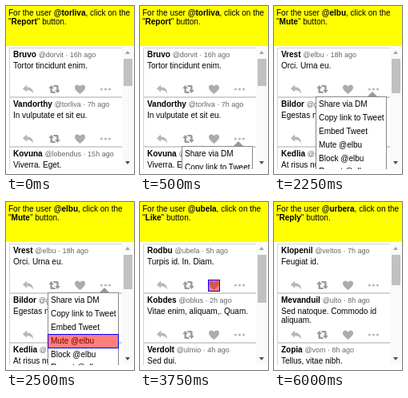
Recreate the animation shown at these times as an HTML page. Size 160 px wide and 210 px high, loop 7.25 s.

```html
<!DOCTYPE html>
<html lang="en">
<head>
<meta charset="utf-8">
<title>Social feed tasks</title>
<style>
html, body { margin: 0; width: 100%; height: 100%; overflow: hidden; background: #fff; }
#stage {
  position: relative; width: 160px; height: 210px; overflow: hidden;
  font: 10px/11px "Liberation Sans", Arial, sans-serif; color: #000;
}
#stage div, #stage svg { position: absolute; box-sizing: border-box; }
.scene { inset: 0; }
.query { left: 0; top: 0; width: 160px; height: 50px; padding: 3px; background: #ff0; white-space: nowrap; }
.area { left: 0; top: 0; width: 160px; height: 204px; overflow: hidden; }
.card { left: 4px; width: 141px; height: 62px; border: 1px solid #d3d3d3; border-right: 0; }
.head { left: 4px; top: 2px; white-space: nowrap; }
.head span { font-size: 9px; line-height: 9px; color: #666; }
.text { left: 4px; top: 16px; width: 131px; }
.card svg { top: 44px; width: 15px; height: 15px; fill: #b8b8b8; }
.card svg.retweet { fill: #999; }
.card svg.like { fill: #acacac; }
.track { left: 145px; top: 51px; width: 15px; height: 153px; background: #fafafa; }
.thumb { left: 2px; top: 15px; width: 11px; background: #c1c1c1; }
.arrow { left: 4px; border: 4px solid transparent; border-width: 0 3.5px 4px; }
.up { top: 5px; border-bottom-color: #a3a3a3; }
.down { bottom: 6px; border-width: 4px 3.5px 0; border-top-color: #505050; }
.menu { left: 52px; width: 89px; height: 110px; background: #fff; border: 1px solid #888; }
.menu div { left: 3px; white-space: nowrap; }
.caret { left: 117px; border: 6px solid transparent; border-width: 0 6.5px 6px; border-bottom-color: #999; }
.mark { background: rgba(255, 0, 0, .5); border: 1px solid #00f; }

/* one loop, hard cuts */
.timed { visibility: hidden; animation: 7250ms step-end infinite; }
@keyframes report { 0% { visibility: visible } 24.1379%, 100% { visibility: hidden } }
@keyframes mute { 0% { visibility: hidden } 24.1379% { visibility: visible } 48.2758%, 100% { visibility: hidden } }
@keyframes like { 0% { visibility: hidden } 48.2758% { visibility: visible } 65.5172%, 100% { visibility: hidden } }
@keyframes retweet { 0% { visibility: hidden } 65.5172% { visibility: visible } 82.7586%, 100% { visibility: hidden } }
@keyframes reply { 0% { visibility: hidden } 82.7586%, 100% { visibility: visible } }
@keyframes reportMore { 0% { visibility: hidden } 3.4482% { visibility: visible } 6.8965%, 100% { visibility: hidden } }
@keyframes reportMenu { 0% { visibility: hidden } 6.8965% { visibility: visible } 24.1379%, 100% { visibility: hidden } }
@keyframes muteMore { 0% { visibility: hidden } 27.5862% { visibility: visible } 31.0344%, 100% { visibility: hidden } }
@keyframes muteMenu { 0% { visibility: hidden } 31.0344% { visibility: visible } 48.2758%, 100% { visibility: hidden } }
@keyframes mutePick { 0% { visibility: hidden } 34.4827% { visibility: visible } 48.2758%, 100% { visibility: hidden } }
@keyframes likePick { 0% { visibility: hidden } 51.7241% { visibility: visible } 65.5172%, 100% { visibility: hidden } }
</style>
</head>
<body>
<svg width="0" height="0" style="position:absolute">
  <symbol id="reply" viewBox="0 0 15 15"><path d="M.8 6.2 6 1.6V4.3C11 4.3 14 7.2 14.2 12.6 12.6 9.6 10 8.2 6 8.2V10.8Z"/></symbol>
  <symbol id="retweet" viewBox="0 0 15 15">
    <path id="half" d="M3.6 2 .2 6H2.4V10.4Q2.4 12 4 12H9.4L7.6 9.8H4.8V6H7Z"/>
    <use href="#half" transform="rotate(180 7.5 7)"/>
  </symbol>
  <symbol id="like" viewBox="0 0 15 15"><path d="M7.5 13C3 9.6 1 7.4 1 4.8 1 1 5.8 .4 7.5 3.6 9.2 .4 14 1 14 4.8 14 7.4 12 9.6 7.5 13Z"/></symbol>
  <symbol id="more" viewBox="0 0 15 15"><circle cx="2.3" cy="7" r="1.6"/><circle cx="7.4" cy="7" r="1.6"/><circle cx="12.5" cy="7" r="1.6"/></symbol>
</svg>
<div id="stage"></div>
<script>
const icons = { reply: 20, retweet: 53, like: 85, more: 117 };
const pitch = 62;

const scenes = [
  { id: 'report', user: '@torliva', ask: ', click on the<br>"<b>Report</b>" button.', thumb: 34, cards: [
    ['Bruvo', '@dorvit', 16, 'Tortor tincidunt enim.'],
    ['Vandorthy', '@torliva', 7, 'In vulputate et sit eu.'],
    ['Kovuna', '@lobendus', 15, 'Viverra. Eget.']],
    extra: () => mark('reportMore', 117, 159, 15, 15) + menu('reportMenu', 1, '@torliva') },
  { id: 'mute', user: '@elbu', ask: ', click on the<br>"<b>Mute</b>" button.', thumb: 43, cards: [
    ['Vrest', '@elbu', 18, 'Orci. Urna eu.'],
    ['Bildor', '@grenbos', 16, 'Egestas nunc at adipiscing.'],
    ['Kedlia', '@sobna', 9, 'At risus nulla.']],
    extra: () => mark('muteMore', 117, 97, 15, 15) + menu('muteMenu', 0, '@elbu') + mark('mutePick', 52, 165, 89, 18) },
  { id: 'like', user: '@ubela', ask: ', click on the<br>"<b>Like</b>" button.', thumb: 60, cards: [
    ['Rodbu', '@ubela', 5, 'Turpis id. In. Diam.'],
    ['Kobdes', '@oblus', 2, 'Vitae enim, aliquam,. Quam.'],
    ['Verdolt', '@ulmio', 4, 'Sed dui.']],
    extra: () => mark('likePick', 85, 97, 15, 15) },
  { id: 'retweet', user: '@pontelia', ask: ', click on<br>the "<b>Retweet</b>" button.', thumb: 34, cards: [
    ['Nubelte', '@trun', 14, 'Mus dui orci tortor.'],
    ['Dunvo', '@sobna', 9, 'Pulvinar id.'],
    ['Ulio', '@tomvelia', 12, 'Morbi nec. Condimentum']] },
  { id: 'reply', user: '@urbera', ask: ', click on the<br>"<b>Reply</b>" button.', thumb: 38, cards: [
    ['Klopenil', '@veltos', 7, 'Feugiat id.'],
    ['Mevanduil', '@ulto', 8, 'Sed natoque. Commodo id aliquam.'],
    ['Zopia', '@vom', 8, 'Tellus, vitae nibh.']] }
];

function mark(anim, x, y, w, h) {
  return `<div class="mark timed" style="animation-name:${anim};left:${x}px;top:${y}px;width:${w}px;height:${h}px"></div>`;
}

function menu(anim, row, user) {
  const top = 113 + row * pitch;
  const items = ['Share via DM', 'Copy link to Tweet', 'Embed Tweet', 'Mute ' + user, 'Block ' + user, 'Report ' + user]
    .map((label, i) => `<div style="top:${Math.round(3.3 + 16.8 * i)}px">${label}</div>`).join('');
  return `<div class="timed" style="animation-name:${anim};inset:0">
    <div class="caret" style="top:${top - 6}px"></div>
    <div class="menu" style="top:${top}px">${items}</div></div>`;
}

function card([name, user, hours, text], i) {
  const bar = Object.entries(icons).map(([id, x]) =>
    `<svg class="${id}" style="left:${x - 5}px"><use href="#${id}"/></svg>`).join('');
  return `<div class="card" style="top:${52 + i * pitch}px">
    <div class="head"><b>${name}</b> <span>${user} · ${hours}h ago</span></div>
    <div class="text">${text}</div>${bar}</div>`;
}

function scene({ id, user, ask, thumb, cards, extra }) {
  return `<div class="scene timed" style="animation-name:${id}">
    <div class="query">For the user <b>${user}</b>${ask}</div>
    <div class="area">${cards.map(card).join('')}
      <div class="track"><div class="arrow up"></div><div class="thumb" style="height:${thumb}px"></div><div class="arrow down"></div></div>
      ${extra ? extra() : ''}</div></div>`;
}

document.getElementById('stage').innerHTML = scenes.map(scene).join('');
</script>
</body>
</html>
```
